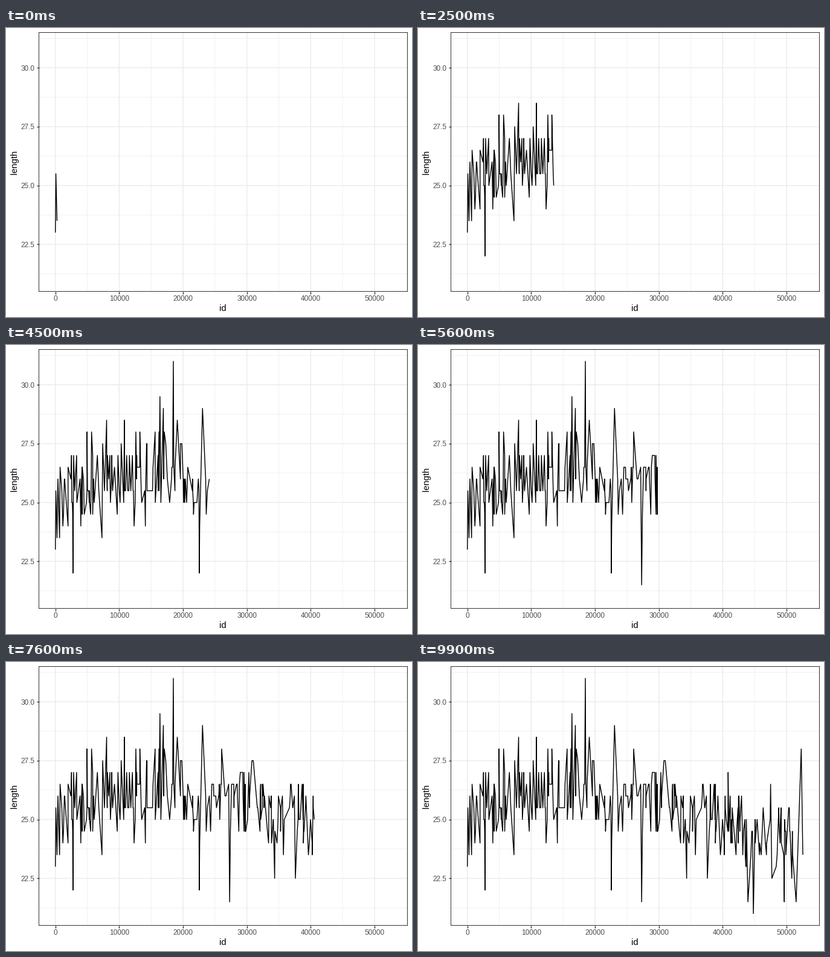
Animation of 672 by 480 pixels, one loop 10000 ms. Source, as a matplotlib script:

```python
import numpy as np
import matplotlib.pyplot as plt
from matplotlib.animation import FuncAnimation
from matplotlib.ticker import MultipleLocator

W, H, DPI = 672, 480, 96
PX = 72 / DPI  # points per pixel
FRAMES, INTERVAL = 100, 100
INK, GRID = "#333333", "#EBEBEB"

plt.rcParams["font.family"] = "Liberation Sans"

# Opening strokes and the most prominent peaks and dips: (id, length)
KEYS = [
    (0, 23), (80, 25.5), (260, 23.5), (400, 26), (660, 23.5), (740, 26.5),
    (2750, 22), (4960, 28), (5670, 28), (7300, 23.5), (8030, 28.5),
    (10820, 28.5), (12330, 24), (14100, 24), (16380, 29.5), (16920, 29),
    (18480, 31), (19100, 28.5), (22550, 22), (23050, 29), (26050, 28),
    (27300, 21.5), (34350, 22.5), (37600, 22.5), (40850, 27), (43950, 21.5),
    (44800, 21), (47500, 26.5), (49650, 21.5), (51500, 21.5), (52300, 28),
    (52550, 23.5),
]


def trend(x):
    return np.interp(x, [800, 9000, 17500, 22000, 25000, 40000, 52550],
                     [25.2, 26.3, 26.8, 25.4, 26.4, 24.8, 23.8])


def build_series(seed=7):
    """Noise around the trend in half steps, merged with the key points."""
    rng = np.random.default_rng(seed)
    x = 900 + np.cumsum(rng.exponential(160, 400))
    x = x[x < 51400]
    noise = np.clip(rng.normal(0, 1, x.size), -1.6, 1.6)
    y = np.round(2 * (trend(x) + noise)) / 2
    points = np.vstack([KEYS, np.column_stack([x, y])])
    return points[np.argsort(points[:, 0])].T


xs, ys = build_series()
STEP = xs[-1] / (FRAMES - 1)

fig = plt.figure(figsize=(W / DPI, H / DPI), dpi=DPI, facecolor="white")
ax = fig.add_axes([54.5 / W, 1 - 437.5 / H, 610 / W, 430 / H])
ax.set(xlim=(-2575, 55157), ylim=(20.5, 31.5))
ax.set_axisbelow(True)

for axis, major, fmt in ((ax.xaxis, 10000, "{x:.0f}"), (ax.yaxis, 2.5, "{x:.1f}")):
    axis.set_major_locator(MultipleLocator(major))
    axis.set_major_formatter(fmt)

for x in range(5000, 55001, 10000):
    ax.axvline(x, color=GRID, lw=0.71 * PX, zorder=0.4, snap=False)
for y in np.arange(21.25, 31.5, 2.5):
    ax.axhline(y, color=GRID, lw=0.71 * PX, zorder=0.4, snap=False)
ax.grid(color=GRID, lw=1.42 * PX, snap=False)

ax.tick_params(length=3.67 * PX, width=1.42 * PX, color=INK,
               labelcolor="#4D4D4D", labelsize=8.8, pad=3.3 * PX)
for tick in ax.get_xticklines() + ax.get_yticklines():
    tick.set_snap(False)
for spine in ax.spines.values():
    spine.set(color=INK, linewidth=PX, snap=False)

fig.text(359 / W, 1 - 470 / H, "id", size=11, ha="center", va="baseline")
fig.text(17.5 / W, 1 - 222.5 / H, "length", size=11, rotation=90,
         rotation_mode="anchor", ha="center", va="baseline")

line, = ax.plot([], [], color="black", lw=1.42 * PX,
                solid_joinstyle="round", solid_capstyle="butt")


def update(i):
    n = np.searchsorted(xs, (i + 0.5) * STEP, side="right")
    px, py = xs[:n], ys[:n]
    head = i * STEP
    if px[-1] < head:  # still travelling towards the next point
        px = np.append(px, head)
        py = np.append(py, np.interp(head, xs, ys))
    line.set_data(px, py)
    return line,


anim = FuncAnimation(fig, update, frames=FRAMES, interval=INTERVAL,
                     repeat=True, repeat_delay=0)
plt.show()
```
